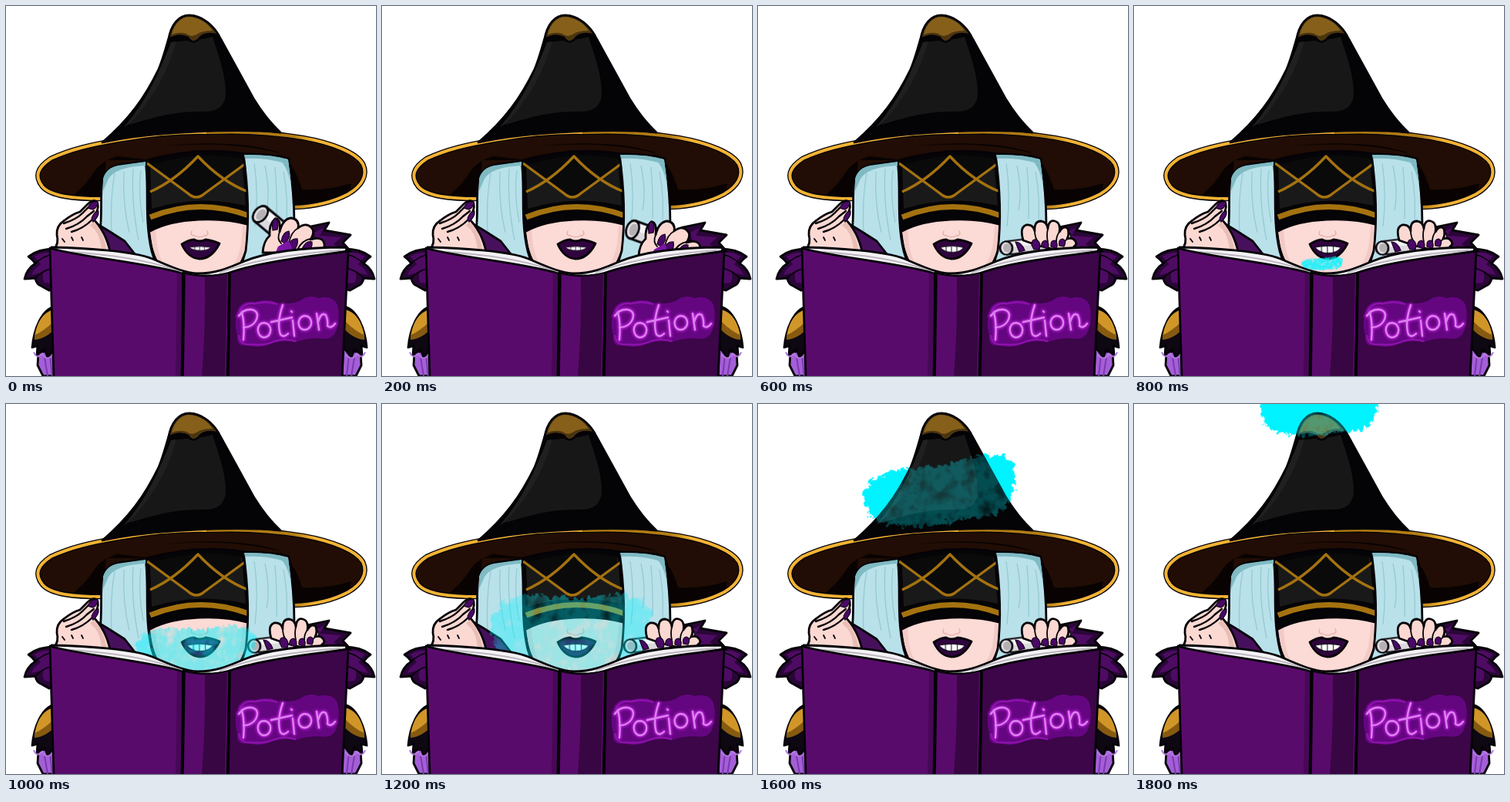
An HTML page for the animation above (2 s loop, 480x480 px).

```html
<!DOCTYPE html>
<html lang="en">
<head>
<meta charset="utf-8">
<title>Witch reading</title>
<style>
html, body { margin: 0; width: 100%; height: 100%; overflow: hidden; background: #fff; }
svg { display: block; width: 100vw; height: 100vh; }
.ink { stroke: #050208; stroke-width: 2.8; stroke-linejoin: round; stroke-linecap: round; }
.line { fill: none; stroke: #050208; stroke-width: 1.8; stroke-linecap: round; }
.gold { fill: none; stroke: #a4720f; stroke-width: 3.4; stroke-linejoin: round; }
.band { stroke-width: 7; }
.skin { fill: #fbd9d2; }
.nail { fill: #4b0868; stroke: #12021b; stroke-width: 1.2; }
.cloud, .mist, .scroll, .raised, .lowered, .teeth { animation: 2s step-end infinite; }
.cloud { animation-name: rise; }
.mist { animation-name: thin; }
.scroll { animation-name: roll; }
.raised { animation-name: raised; }
.lowered { animation-name: lowered; }
.teeth { animation-name: grin; transform-origin: 252px 313px; }
@keyframes rise {
  0%   { transform: scale(0); }
  40%  { transform: translate(244px, 334px) scale(.27, .2); }
  50%  { transform: translate(246px, 321px) rotate(4deg) scale(.78, .85); }
  60%  { transform: translate(244px, 296px) rotate(7deg) scale(1.04, 1.3); }
  70%  { transform: translate(235px, 231px) rotate(-2deg) scale(1.2, 1.1); }
  80%  { transform: translate(236px, 114px) rotate(-4deg); }
  90%  { transform: translate(241px, 6px) scale(.77, .82); }
}
@keyframes thin {
  0%  { opacity: .85; }
  50% { opacity: .5; }
  60% { opacity: .38; }
  70% { opacity: .45; }
  80% { opacity: .3; }
  90% { opacity: .38; }
}
@keyframes roll {
  0%  { transform: translate(330px, 270px) rotate(40deg); }
  10% { transform: translate(325px, 290px) rotate(20deg); }
  20% { transform: translate(321px, 309px) rotate(-1deg) scale(1, .86); }
  30% { transform: translate(322px, 314px) rotate(-7deg) scale(1, .72); }
}
@keyframes raised { 0% { transform: none; } 10% { transform: translate(0, 4px); } 20% { opacity: 0; } }
@keyframes lowered { 0% { opacity: 0; } 20% { opacity: 1; } }
@keyframes grin {
  0%  { transform: scale(.9, .7); }
  20% { transform: scale(.95, .85); }
  30% { transform: scale(1, 1.1); }
  40% { transform: scale(1.1, 1.3); }
}
</style>
</head>
<body>
<svg viewBox="0 0 480 480">
<defs>
  <filter id="rough" x="-20%" y="-30%" width="140%" height="160%" color-interpolation-filters="sRGB">
    <feTurbulence type="fractalNoise" baseFrequency=".12" numOctaves="3" seed="4"/>
    <feDisplacementMap in="SourceGraphic" scale="18" xChannelSelector="R" yChannelSelector="G"/>
  </filter>
  <filter id="smoky" x="-20%" y="-30%" width="140%" height="160%" color-interpolation-filters="sRGB">
    <feTurbulence type="fractalNoise" baseFrequency=".12" numOctaves="3" seed="4" result="n"/>
    <feDisplacementMap in="SourceGraphic" in2="n" scale="18" xChannelSelector="R" yChannelSelector="G" result="c"/>
    <feTurbulence type="fractalNoise" baseFrequency=".06" numOctaves="4" seed="9"/>
    <feColorMatrix values="0 0 0 0 0  0 0 0 0 0  0 0 0 0 0  1.6 0 0 0 .12"/>
    <feComposite in="c" operator="in"/>
  </filter>
  <filter id="glow" x="-20%" y="-40%" width="140%" height="180%"><feGaussianBlur stdDeviation="1.6"/></filter>
  <linearGradient id="rim" gradientUnits="userSpaceOnUse" x1="40" x2="468">
    <stop stop-color="#f3b334"/><stop offset=".515" stop-color="#f3b334"/><stop offset=".515" stop-color="#a7730f"/>
    <stop offset=".78" stop-color="#b57e14"/><stop offset=".84" stop-color="#f3b334"/><stop offset="1" stop-color="#f3b334"/>
  </linearGradient>
  <path id="puff" fill="#00f3ff" d="M-98 2C-102-18-78-28-55-31C-30-37 0-30 30-38C55-44 88-47 96-32C102-10 96 10 85 24C65 40 40 35 15 40C-10 46-50 42-70 36C-90 34-97 20-98 2Z"/>
  <path id="brim" d="M125 250C88 250 58 247 47 234C37 221 40 210 58 198C84 186 110 180 145 174C190 166 230 163 265 164C310 162 355 166 385 171C425 178 455 191 463 205C470 220 461 234 444 244C425 254 402 260 374 261Z"/>
  <clipPath id="under"><use href="#brim"/></clipPath>
  <g id="shoulder">
    <path class="ink" fill="#2a0638" d="M64 315Q42 315 29 325Q35 329 38 334Q27 341 24 354L38 353Q39 361 47 364L56 369L66 366Z"/>
    <path fill="#4e0b63" d="M60 320Q46 319 37 325L45 335Q35 342 33 349L49 345Q46 353 50 359L60 360Z"/>
    <path class="line" d="M60 322Q46 326 38 334M60 340Q46 344 38 353"/>
    <path fill="#a45fd8" class="ink" d="M42 450L41 466L48 480H66V445Z"/>
    <path d="M50 456L54 480M57 452L60 480" stroke="#7c3aae" stroke-width="2"/>
    <path fill="#0d0812" class="ink" d="M64 390C46 393 36 420 34 443L41 441L40 453L50 445L54 456L64 443Z"/>
    <path fill="#d09628" d="M62 394C47 397 39 413 37 430C46 430 57 422 63 412Z"/>
    <path fill="#865a10" d="M62 409C54 417 46 423 37 427L37 433C48 432 57 426 63 419Z"/>
    <path fill="none" stroke="#b477df" stroke-width="2" d="M36 449Q40 459 47 451Q52 462 62 452"/>
  </g>
  <path id="word" d="M306 397Q310 413 308 433M302 402C310 390 327 392 326 402C325 413 315 417 308 417M335 411C323 411 325 430 335 430C346 429 346 412 335 411M359 388Q351 411 356 426Q360 431 366 425M344 410L371 404M372 408L374 428M370 396L371 397M387 402C376 404 378 421 388 420C400 418 398 401 387 402M403 399L406 420M405 410Q409 396 415 401Q418 408 417 415Q422 419 427 412"/>
</defs>

<g class="cloud"><use href="#puff" filter="url(#rough)"/></g>

<use href="#shoulder"/>
<use href="#shoulder" transform="matrix(-1 0 0 1 502 0)"/>
<path class="ink" fill="#2a0638" d="M366 300L390 287L419 281L413 291L447 297L437 307L447 318L375 320Z"/>
<path fill="#4e0b63" d="M400 294L413 287L407 298L435 300L425 309L435 315H405Z"/>

<g id="hat">
  <use href="#brim" fill="#210d05"/>
  <g clip-path="url(#under)">
    <path fill="#080302" d="M75 255Q102 236 116 213Q126 198 160 190C215 176 300 173 352 189Q374 203 384 238Q415 240 448 230L440 265H370L364 200H130L125 255Z"/>
    <path fill="#210d05" d="M140 194C190 176 310 174 363 194L310 191Q245 181 180 199Z"/>
  </g>
  <use href="#brim" fill="none" stroke="#050208" stroke-width="6.6"/>
  <use href="#brim" fill="none" stroke="url(#rim)" stroke-width="4"/>
  <path class="ink" fill="#040305" d="M125 177C160 147 180 119 198 82C209 56 211 31 222 20Q236 7 253 16C266 23 274 33 282 49C290 64 303 87 321 120C332 138 343 152 356 164C305 159 190 162 125 177Z"/>
  <path fill="#171717" d="M216 47C237 44 252 45 268 40C275 63 286 91 285 115C283 133 271 138 252 137C220 136 189 145 160 154C183 124 201 86 216 47Z"/>
  <path fill="#202020" d="M214 47L221 46C211 81 194 117 160 153L153 157C183 123 200 83 214 47Z"/>
  <path class="ink" fill="#4b3510" d="M211 43C214 24 224 12 238 12C254 13 268 24 276 38C262 34 254 37 249 44Q241 50 236 41C226 36 218 39 211 43Z"/>
  <path fill="#86601a" d="M215 37C219 21 229 14 238 14C252 15 262 23 268 32Q254 32 247 37Q240 41 234 36Q225 33 215 37Z"/>
</g>

<g id="head">
  <path class="ink" fill="#fcdad5" d="M185 275H315C316 306 311 328 298 342L251 352L204 343C190 328 186 306 185 275Z"/>
  <path fill="#f2cac6" d="M187 292C190 315 193 329 207 342L211 343C197 328 195 309 194 287ZM314 287C313 315 307 329 296 342L292 340C304 325 306 307 307 285Z"/>
  <path fill="none" stroke="#e3b5b0" stroke-width="1.5" stroke-linecap="round" d="M241 292Q238 298 245 298Q251 302 257 298Q264 298 261 292"/>
  <path class="ink" fill="#050406" d="M180 202Q245 181 311 192L316 284C279 273 220 274 187 292Z"/>
  <path fill="#191919" d="M187 207Q248 188 306 199L311 259Q250 244 189 263Z"/>
  <path fill="#0a0a0b" d="M189 209L242 246L249 250L305 207V198Q248 187 187 207Z"/>
  <path class="gold" d="M183 204L236 243Q247 253 258 243L310 205M187 241Q219 227 249 195Q280 228 314 241"/>
  <path class="gold band" d="M187 274Q250 248 315 272"/>
  <path class="line" d="M187 279Q250 254 315 277"/>
  <path class="ink" fill="#b9e1ea" d="M125 224Q128 211 146 206L181 201C186 235 179 275 189 318L196 340H160L122 292C125 270 122 246 125 224Z"/>
  <path class="ink" fill="#b9e1ea" d="M308 192Q342 191 367 198C371 223 374 250 374 284L363 330L304 340L311 318C316 276 314 235 308 192Z"/>
  <path fill="#80bac3" d="M126 224Q130 210 145 207L181 202V207Q142 209 133 224L126 240ZM309 193Q344 192 366 199L370 232Q365 210 358 203Q337 197 310 198Z"/>
  <path fill="none" stroke="#95cad3" stroke-width="1.3" d="M141 217Q135 250 137 295M153 215Q151 257 160 294M165 211Q162 254 172 304M175 213Q171 244 178 281M322 204Q328 245 323 286M336 207Q343 242 338 265M349 209Q352 250 351 276M360 215Q366 248 364 277"/>
  <path class="ink" fill="#30053f" d="M228 309Q238 303 244 303Q252 307 259 303Q267 304 277 308C270 322 261 328 251 328Q236 327 228 309Z"/>
  <g class="teeth">
    <path fill="#fff" stroke="#10021a" d="M236 313Q252 310 267 313Q263 319 252 319Q242 319 236 313Z"/>
    <path fill="none" stroke="#050208" stroke-width=".9" d="M244 312V318M251 312V319M258 312V318"/>
  </g>
</g>

<path class="ink" fill="#47105c" d="M117 282L132 291L154 305L172 328L125 322Z"/>
<g class="scroll">
  <path class="ink" fill="#dcdade" d="M0-12H84V12H0Z"/>
  <path fill="#f4f3f5" d="M3-10H84V0H3Z"/>
  <ellipse class="ink" fill="#e7e4e6" rx="8" ry="12"/>
  <ellipse fill="#b5b0b3" cx="1" rx="5" ry="8"/>
</g>

<g class="cloud"><g class="mist"><use href="#puff" filter="url(#smoky)"/></g></g>

<g id="hands">
  <path class="ink skin" d="M62 316Q69 308 66 297Q65 285 76 278Q86 270 96 267L106 257Q115 249 119 256Q121 266 112 275C123 286 131 299 135 319Z"/>
  <path fill="#e9beb6" d="M113 280Q126 290 131 318L124 317Q122 293 109 285Z"/>
  <path class="line" style="stroke-width:2.4" d="M75 282Q91 277 99 269L110 258M78 289Q95 284 105 273L114 266M85 293Q100 289 112 277"/>
  <path class="line" d="M73 302L76 306M85 300L87 304M98 300L100 304"/>
  <path class="nail" d="M106 262Q111 252 119 254Q119 261 113 264ZM111 277Q113 267 120 266Q121 273 113 280Z"/>

  <g class="raised">
    <path class="ink skin" d="M333 320Q334 305 342 298Q341 283 349 276Q357 276 355 293Q359 276 370 275Q381 277 379 288Q391 279 398 290Q400 295 395 303Q411 298 413 309V320Z"/>
    <path class="line" d="M355 293Q351 302 357 308M379 288Q370 293 367 307M395 302Q384 304 378 316"/>
    <path class="nail" d="M346 291Q344 279 350 275Q355 281 352 290ZM357 305Q359 293 367 292Q370 300 362 308ZM366 312Q369 301 378 302Q380 311 373 317ZM384 315Q389 304 397 306Q398 314 391 319Z"/>
    <path fill="#7b16a5" d="M353 312L367 304L373 319H350Z"/>
  </g>
  <g class="lowered">
    <path class="ink skin" d="M344 304Q339 287 348 284Q357 283 359 292Q358 279 367 279Q375 280 376 289Q377 277 385 279Q393 281 391 293Q396 284 402 289Q404 297 401 302Q411 299 413 309L406 316H386L364 311Z"/>
    <path class="line" d="M359 292Q359 301 364 307M376 289Q374 298 376 306M391 293Q387 298 387 306M401 302L396 308"/>
    <path class="nail" d="M355 310Q355 302 361 303Q368 307 365 316L358 316ZM368 312Q367 305 373 304Q379 307 376 315ZM380 312Q379 304 385 304Q390 308 387 315ZM391 311Q389 303 395 302Q401 304 397 312Z"/>
    <path class="nail" d="M334 306Q342 306 346 317L339 319Z"/>
  </g>
</g>

<g id="book">
  <path class="ink" fill="#f4f2f4" d="M59 313C105 314 166 318 190 328C214 338 230 346 249 347C271 347 286 341 307 332C342 317 393 313 442 313L440 324L291 351L230 352L60 323Z"/>
  <path fill="none" stroke="#bdb7c0" stroke-width="2" d="M67 318Q175 324 226 345M277 346Q333 324 434 317"/>
  <path class="ink" fill="#590b6b" d="M57 314C90 325 185 333 229 347L228 482H62Z"/>
  <path fill="#480857" d="M222 346L228 348V480H220Z"/>
  <path class="ink" fill="#3c0649" d="M290 346C333 331 401 324 444 318L436 482H288Z"/>
  <path class="ink" fill="#590b6b" d="M230 346Q260 354 290 346L287 482H228Z"/>
  <path fill="#390644" d="M258 351Q274 351 287 347L284 480H254Q259 420 258 351Z"/>
  <path class="line" style="stroke-width:3.6" d="M231 349L229 480M290 349L288 480"/>
</g>

<g id="label" role="img" aria-label="Potion">
  <path fill="#650681" d="M301 393Q306 381 323 384Q340 379 352 385Q370 388 382 382Q393 374 406 379Q424 374 430 388Q434 405 429 419Q425 435 406 431Q389 431 376 436Q359 432 344 438Q329 445 314 440Q298 443 300 427Q295 410 301 393Z"/>
  <path fill="none" stroke="#9a14ba" stroke-width="2.4" opacity=".75" d="M302 427Q303 441 318 439Q334 441 346 436Q360 430 376 435M303 396Q308 384 323 386Q340 382 352 387"/>
  <g fill="none" stroke-linecap="round" stroke-linejoin="round">
    <use href="#word" stroke="#b91fd8" stroke-width="5" filter="url(#glow)"/>
    <use href="#word" stroke="#dc82ee" stroke-width="2.4"/>
  </g>
</g>
</svg>
</body>
</html>
```
